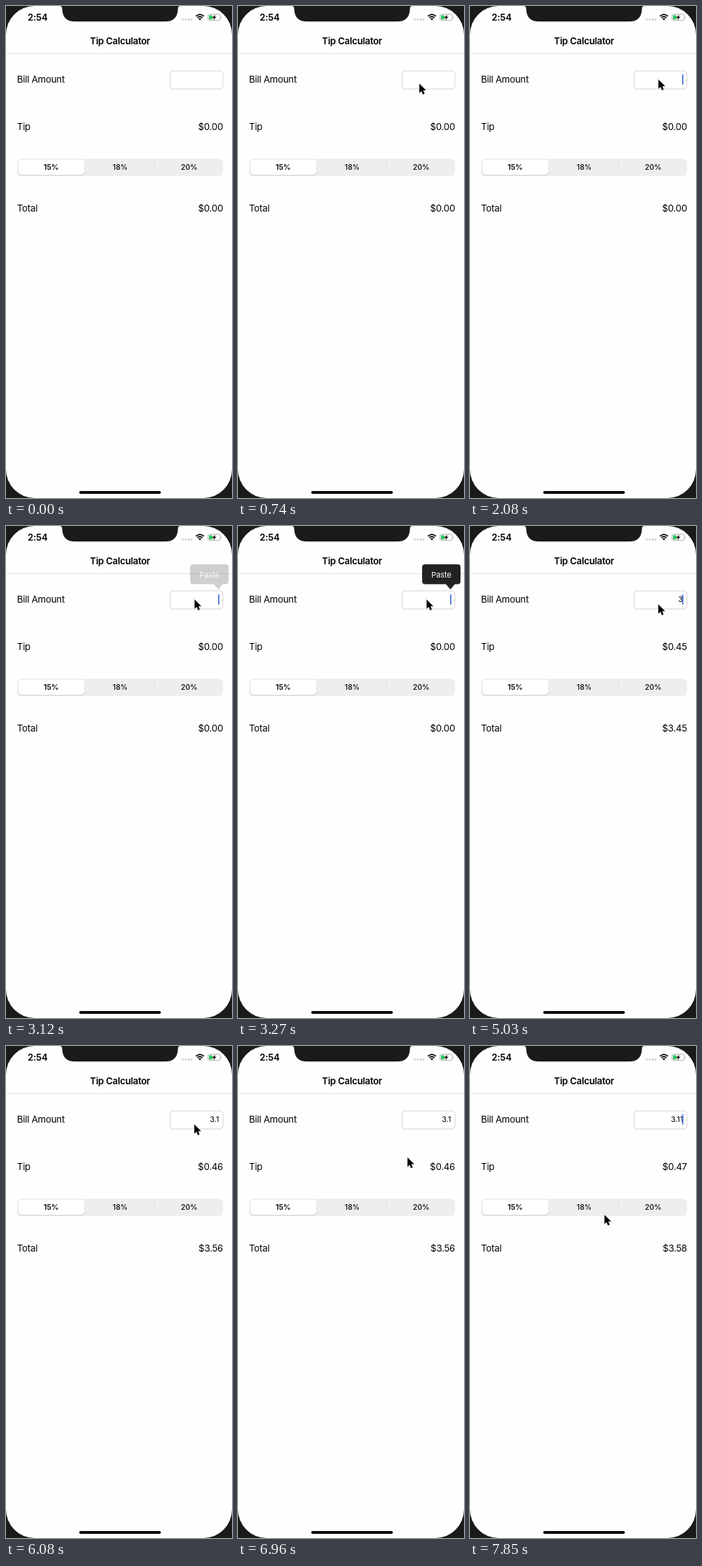
Recreate the animation shown at these times as an HTML page. Size 324 by 706 pixels, loop 8000 ms.

```html
<!DOCTYPE html>
<html lang="en">
<head>
<meta charset="utf-8">
<title>Tip Calculator</title>
<style>
  html, body { margin: 0; height: 100%; overflow: hidden; background: #1a1a1a; }
  svg { display: block; width: 100vw; height: 100vh; }
  text { font: 13.3px Inter, Roboto, sans-serif; letter-spacing: -.25px; }
  .bold { font-weight: 600; }
  .end { text-anchor: end; }
  .mid { text-anchor: middle; }
  .seg text { font-size: 10.4px; font-weight: 500; letter-spacing: 0; }
  .seg .bold { font-size: 10.6px; font-weight: 600; }
  .small { font-size: 11px; letter-spacing: -.1px; }
</style>
</head>
<body>
<svg viewBox="0 0 324 706">
  <rect width="324" height="706" rx="41" fill="#fefefe"/>
  <path d="M77 0Q80.500 0 80.500 4Q81 22.300 99 22.300H228Q246 22.300 246.500 4Q246.500 0 250 0Z" fill="#1a1a1a"/>

  <text class="bold" x="31" y="21" font-size="12.600">2:54</text>
  <path d="M253.500 19.300H266" stroke="#c9c9c9" stroke-width="2.800" stroke-linecap="round" stroke-dasharray="0 4"/>
  <path d="M272.300 14.700Q278 9.600 283.700 14.700M274.300 16.900Q278 13.600 281.700 16.900" fill="none" stroke="#000" stroke-width="1.700"/>
  <path d="M276 18.400Q278 16.800 280 18.400L278 20.500Z"/>
  <rect x="289.500" y="11.800" width="18" height="8.800" rx="2.600" fill="none" stroke="#a5a5a5" stroke-width=".9"/>
  <path d="M308.800 14.700Q310.400 16.200 308.800 17.700Z" fill="#a5a5a5"/>
  <rect x="290.900" y="13.200" width="5.200" height="6" rx="1.200" fill="#35c759"/>
  <path d="M300 12.200L295.500 16.900H298.200L297 20.400L301.700 15.500H298.900Z"/>

  <path d="M0 68.500H324" stroke="#dedede"/>
  <text class="bold mid" x="163.500" y="55.300">Tip Calculator</text>
  <text x="15.800" y="110.400">Bill Amount</text>
  <text x="15.800" y="177.500">Tip</text>
  <text x="15.800" y="294.500">Total</text>
  <text class="end" id="tip" x="311.100" y="177.500"></text>
  <text class="end" id="total" x="311.100" y="294.500"></text>

  <rect x="235" y="93" width="76" height="26" rx="4" fill="#fff" stroke="#d2d2d2"/>
  <text class="end small" id="bill" x="305.300" y="109.400"></text>
  <rect id="caret" x="304.200" y="98" width="1.700" height="15" rx=".8" fill="#456fe6"/>

  <g class="seg">
    <rect x="16" y="219" width="295" height="25" rx="6.500" fill="#eee"/>
    <rect x="17" y="220.500" width="96" height="23" rx="5.500" fill="#d3d3d3"/>
    <rect x="17.500" y="220.300" width="95" height="22" rx="5.300" fill="#fff"/>
    <path d="M212.500 225V238" stroke="#dadada"/>
    <text class="mid bold" x="64.900" y="235.300">15%</text>
    <text class="mid" x="163.700" y="235.300">18%</text>
    <text class="mid" x="262.500" y="235.300">20%</text>
  </g>

  <rect x="105" y="696" width="117" height="4" rx="2"/>

  <g id="menu">
    <path d="M268 55H315Q319 55 319 59V79Q319 83.500 315 83.500H311L304.500 91L298 83.500H268Q264 83.500 264 79V59Q264 55 268 55Z" fill="#222"/>
    <text class="mid small" x="291.500" y="73.500" fill="#fff">Paste</text>
  </g>
  <g id="cursor">
    <path d="M0 0V15.500L3.500 12.200L5.900 17.900L8.700 16.700L6.400 11.200H11.200Z" transform="scale(.86)" stroke="#fff" stroke-width="1.800" paint-order="stroke" style="filter:drop-shadow(0 .8px .7px #0005)"/>
  </g>
</svg>
<script>
const LOOP = 8000, STEP = LOOP / 54;
const el = id => document.getElementById(id);
const clamp = v => Math.min(1, Math.max(0, v));
const passed = (times, t) => times.filter(s => s <= t).length;
const money = n => "$" + Math.max(0, n - 1e-9).toFixed(2);

const keystrokes = [4890, 5480, 5930, 7400];
const blinks = [2080, 3420, 4300, 4740, 5030, 6080, 6670, 6960, 7700];

// Pointer stops: time, x, y
const stops = [
  [0, 205, -30], [740, 260, 111.5], [1180, 270, 105.5], [3560, 270.5, 105.5],
  [4150, 270, 112.5], [6670, 270, 112.5], [6960, 216, 207.5], [7110, 215.5, 226],
  [7550, 215.5, 226], [7850, 171, 257.5]
];

function pointer(t) {
  const next = stops.findIndex(([time]) => time > t);
  if (next < 0) return stops.at(-1).slice(1);
  const [t0, x0, y0] = stops[next - 1], [t1, x1, y1] = stops[next];
  const p = (t - t0) / (t1 - t0);
  return [x0 + (x1 - x0) * p, y0 + (y1 - y0) * p];
}

function draw(t) {
  const typed = "3.11".slice(0, passed(keystrokes, t));
  const held = Math.floor(t / STEP) * STEP;
  el("bill").textContent = typed;
  el("tip").textContent = money(typed * .15);
  el("total").textContent = money(typed * 1.15);
  el("caret").setAttribute("opacity", passed(blinks, t) % 2);
  el("menu").setAttribute("opacity", clamp((held - 3080) / 150) * clamp((3700 - held) / 300));
  el("cursor").setAttribute("transform", `translate(${pointer(held)})`);
}

const start = performance.now();
function tick() {
  draw((performance.now() - start) % LOOP);
  requestAnimationFrame(tick);
}
tick();
</script>
</body>
</html>
```
